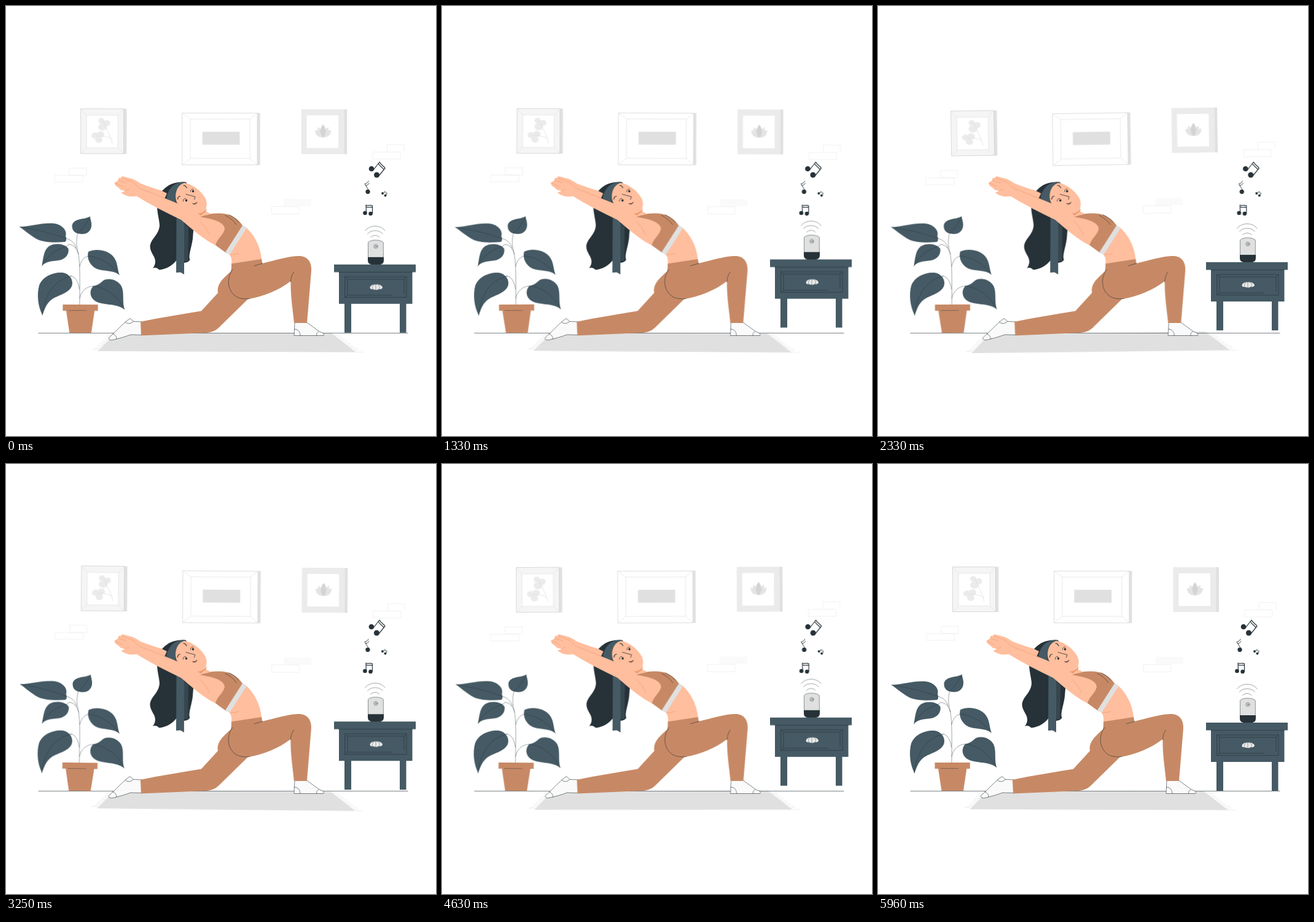
An HTML page that plays this animation: 700 px wide and 700 px high, repeating every 6000 ms.

```html
<!DOCTYPE html>
<html lang="en">
<head>
<meta charset="utf-8">
<title>Yoga at home</title>
<style>
  html, body { margin: 0; width: 100%; height: 100%; overflow: hidden; background: #fff; }
  svg { display: block; width: 100vw; height: 100vh; }

  #wall, #plant { animation: sway 3s linear -35ms infinite; }
  #wall { transform-origin: 363px 367px; }
  #plant { transform-origin: 108px 437px; animation-duration: 1.5s; }
  #table { animation: float 3s linear -35ms infinite; }
  .shake { animation: shake 6s linear -35ms infinite; }

  @keyframes sway {
    0%, 100% { transform: rotate(0deg); }
    25% { transform: rotate(1deg); }
    75% { transform: rotate(-1deg); }
  }
  @keyframes float {
    0%, 100% { transform: translateY(0); }
    50% { transform: translateY(-9.33px); }
  }
  @keyframes shake {
    0%, 100% { transform: translateX(0); }
    10%, 90% { transform: translateX(-.93px); }
    20%, 80% { transform: translateX(1.87px); }
    30%, 50%, 70% { transform: translateX(-3.73px); }
    40%, 60% { transform: translateX(3.73px); }
  }

  .dark { fill: #263238; }
  .slate { fill: #455a64; }
  .tan { fill: #c78965; }
  .skin { fill: #ffbe9d; }
  .grey { fill: #e0e0e0; }
  .white { fill: #fff; }
  .line { fill: none; stroke: #263238; stroke-width: .6; stroke-linecap: round; stroke-linejoin: round; }
  .thin { stroke-width: .45; }
  .blush { fill: none; stroke: #eb996e; stroke-width: .6; stroke-linecap: round; }
  .pale { fill: none; stroke: #e0e0e0; stroke-width: .7; }
  .sock { fill: #fafafa; stroke: #263238; stroke-width: .6; stroke-linejoin: round; }
</style>
</head>
<body>
<svg viewBox="0 0 700 700">
  <g id="wall">
    <!-- bricks -->
    <g class="pale" style="stroke:#ebebeb">
      <path d="M79 276H125V287H79ZM103 276V264H131V276Z"/>
      <path d="M597 237.5H642V249H597ZM620.500 237V225.500H648V236.500"/>
      <path d="M477 326.500V338.500H432.500V326.500Z"/>
    </g>
    <path fill="#fafafa" d="M452 314H497V326H452Z"/>

    <!-- left picture -->
    <path class="grey" d="M191 167.500H196.300V241H191Z"/>
    <path fill="#f5f5f5" stroke="#c4c4c4" stroke-width=".6" d="M121.500 167.500H191.500V240.500H121.500Z"/>
    <path class="white" d="M131 178H182V231H131Z"/>
    <path class="pale" d="M121.500 167.500L131 178H182L191.500 167.500M121.500 240.500L131 231H182L191.500 240.500M131 178V231M182 178V231"/>
    <g fill="#ebebeb">
      <ellipse cx="155" cy="187" rx="5" ry="4.500"/>
      <ellipse cx="164" cy="191" rx="5.500" ry="5"/>
      <ellipse cx="157" cy="197" rx="7" ry="6"/>
      <ellipse cx="145" cy="211" rx="6" ry="5"/>
      <ellipse cx="154" cy="209" rx="6" ry="5"/>
      <ellipse cx="151" cy="218" rx="6" ry="5"/>
    </g>
    <path class="pale" style="stroke:#dadada" d="M158 187C163 200 170 210 173 224M147 212C156 212 166 212 172 217"/>

    <!-- middle picture -->
    <path class="grey" d="M409 174H413.500V259H409Z"/>
    <path class="white" stroke="#d9d9d9" stroke-width=".9" d="M286.700 174.300H409V258.700H286.700Z"/>
    <path class="pale" d="M300 184H397V248H300ZM286.700 174.300L300 184M409 174.300L397 184M286.700 258.700L300 248M409 258.700L397 248"/>
    <path class="grey" d="M319.500 204.700H380.300V225.700H319.500Z"/>

    <!-- right picture -->
    <path class="grey" d="M550 168H555V241H550Z"/>
    <path fill="#ebebeb" d="M480.500 168H550.500V241H480.500Z"/>
    <path class="white" d="M489.500 178H541V231H489.500Z"/>
    <g fill="#e4e4e4">
      <path d="M503 202C511 201 516 207 516 214C508 214 503 210 503 202ZM529 202C521 201 516 207 516 214C524 214 529 210 529 202Z"/>
      <path d="M507 197C514 200 517 207 516 214C509 211 507 205 507 197ZM525 197C518 200 515 207 516 214C523 211 525 205 525 197Z"/>
    </g>
    <path fill="#d4d4d4" d="M516 192.500C522 200 522 208 516 214C510 208 510 200 516 192.500Z"/>

    <!-- mat -->
    <path class="grey" d="M178.500 532.500H530L570 563.500L149.500 562Z"/>
    <path class="pale" style="stroke-width:.6" d="M176 535L164 538M172 539L160 542M168 543L156 546M164 547L152 550M160 551L148 554M156 555L144 558M152 559L140 559.500
      M533 535L546 538M538 539L551 542M543 543L556 546M548 547L561 550M553 551L566 554M558 555L574 558M564 560L574 560.500M569 563.300H582"/>
  </g>

  <path class="line" d="M53 532.500H654"/>

  <g id="plant">
    <path class="line thin" d="M120 486C120 450 121 425 118 405C115 392 113 385 117 368M97 378C105 380 112 385 114 394M101 388C110 388 115 394 118 404
      M134 407C126 409 122 415 120 424M104 439C113 440 118 449 119.500 461M142 456C132 456 122 464 120 476"/>
    <g class="slate">
      <path d="M22 359.500C40 359 60 352 78 354C92 356 100 366 97 375C99 379 98 383 96 384C80 385.500 62 385 51 380C40 374 32 367 22 359.500Z"/>
      <path d="M136.500 342.500C128 348 110 345 107.500 357C107 365 112 370 118 370.500C128 373 138 369 139 358C139.500 351 137 347 136.500 342.500Z"/>
      <path d="M58.500 423C61 407 62 397 70 391C80 385 96 387 101.500 395C103 404 97 411 89 413.500C78 416 67 414 58.500 423Z"/>
      <path d="M184.500 437.500C181 427 182 416 174 407C165 397 146 394 134 400C131 410 136 422 147 427.500C158 432.500 173 429 184.500 437.500Z"/>
      <path d="M59.500 503.500C52 489 50 470 54 455C59 441 76 433 92 434C104 436 110 446 107.500 455C104 466 89 470 79 475C68 480 63 492 59.500 503.500Z"/>
      <path d="M193 494C189 481 193 466 188 456C182 446 170 442.500 161 445.500C155 448 153 454 142 456C135.500 463 136 474 145 480C157 488 179 483 193 494Z"/>
    </g>
    <path class="line thin" d="M22 360C45 363 72 369 97 378M136.500 343C131 355 124 363 117 370M58.500 423C66 406 83 396 101 390M184.500 437.500C172 420 153 409 134 407M59 503.500C62 473 78 445 106 440M193 494C182 472 163 458 142 456"/>
    <path class="tan" d="M92.500 486H149.700V496H144.300L139 532H103.500L98 496H92.500Z"/>
    <path class="line thin" d="M102 495.700H131"/>
  </g>

  <g id="table">
    <g class="slate">
      <path d="M551 484H562V532H551ZM641 484H651.500V532H641Z"/>
      <path d="M542 430H661.500V485H542Z"/>
      <path d="M534 421H667V433.500H534Z"/>
    </g>
    <path class="line" d="M542 433.500H661.500M552 441H652V474.500H552ZM552 441L556 445H648L652 441M556 445V471L552 474.500M556 471H628M648 445V468"/>
    <path fill="#ebebeb" d="M592.500 459C592.500 455.500 596 453.500 602.500 453.500C609 453.500 613 455.500 613 459C611 462 607 461 606 461.500C603 463 600 462.500 599 461.500C596 461.500 593 461.500 592.500 459Z"/>
    <path class="line thin" d="M599 454.500C596 456 596 459 597 461.500M602 454V462.500M606 454.500C609 456 609 459 607 461.500"/>
    <path class="grey" stroke="#263238" stroke-width=".5" d="M589.500 410V385C593 380 610 380 614.300 385V410Z"/>
    <path class="dark" d="M589 409H615V414C615 419 612 421 608 421H596C592 421 589 419 589 414Z"/>
    <circle class="line thin" cx="602" cy="391.500" r="3.200"/>
    <circle class="line thin" cx="602" cy="391.500" r="1.300"/>
    <path class="line thin" d="M584.500 366C592 356 610 356 617 366M588.500 371C594 364 608 364 613 371M593.500 376.500C598 372.500 604 372.500 608 376.500"/>
  </g>

  <g class="shake">
    <!-- notes -->
    <g class="dark">
      <circle cx="595" cy="265" r="4.300"/><circle cx="603.500" cy="275" r="4.500"/>
      <circle cx="589" cy="302.300" r="3.600"/>
      <circle cx="613" cy="305" r="1.900"/><circle cx="617.500" cy="308.500" r="1.900"/>
      <circle cx="584.500" cy="337" r="3.300"/><circle cx="593.500" cy="338" r="3.200"/>
    </g>
    <g class="line" style="stroke-width:1.200">
      <path d="M598 267L608 254C610 259 615 260 617 264L606.500 277M606.500 257C608.500 261 613 262.500 615 266.500"/>
      <path d="M591 301L584 289.500C587 289 589.500 287.500 590 285M585.500 292.500C588 292 590 290.500 591 288.500" style="stroke-width:.9"/>
      <path d="M614 306L616.500 301.500L620.500 304.500L618.500 309M616 303L620 306" style="stroke-width:.6"/>
      <path d="M586.500 337L586 324C589 325.500 593 323.500 596.500 325L596.500 338M586.500 327C589 328.500 593 326.500 596.500 328"/>
    </g>

    <!-- hair -->
    <path class="dark" d="M293 287C268 284 250 299 246.500 318C244.500 332 249 344 250 356C250 372 236 378 234.500 391C234.500 402 243 407 243 416C243 421 241 424 239 427C245 424 248 429 250 429.500C262 428 272 422 279 412L288 418C294 418 298 416 299.500 413C296 405 304 390 304.500 372L307 345L320 325Z"/>
    <path fill="#37474f" d="M286 350L297 360L296.500 415L288 416Z"/>
    <path class="slate" d="M277.500 342L290 350V437L284 433.500L277 434Z"/>

    <!-- back arm -->
    <path class="skin" d="M203 282C218 289 240 297 252 300L262 305L258 314L218 302Z"/>
    <path class="slate" d="M293 286.800C277 284 263 296 261.500 314L277 324C274 310 279 294 293 286.800Z"/>

    <!-- torso -->
    <path class="skin" d="M389 359C403 371 414 389 416.500 414L367 421C368 413 367 408 362 402Z"/>
    <path class="blush" d="M365 405C370 405 374 404 379 403"/>
    <path class="tan" d="M314 343C333 336 356 336 366 341C375 345 383 353 386 359L359 402.500L340.500 389L326 362Z"/>
    <path class="grey" d="M385.500 356.500L391.500 362L364 405L357 401Z"/>
    <path class="line" d="M357 341C364 344 371 350 375 356M363 340C370 343 376 348 379 352"/>

    <!-- head -->
    <path class="skin" d="M278 320C273 306 279 290 291 288C304 290 319 302 325 314C328 322 327 329 323 333L334 338.500C330 340 320 341 312 345L300 342Z"/>
    <path fill="#eb996e" d="M312 337.500C318 338 323.500 335 326 329C327 333 325 336 321 337.500L317 341Z"/>
    <g class="dark">
      <ellipse cx="304.500" cy="301.500" rx="1.700" ry="2"/>
      <ellipse cx="293.500" cy="316.500" rx="1.700" ry="2"/>
    </g>
    <path class="line" d="M289 292C291.500 292 293 293.500 294 296M279.500 314.500C279.500 311.500 281 310 283.500 309.500" style="stroke-width:1.200"/>
    <path class="line" d="M300.500 302.500C300 299.500 302.500 297.500 305 298M288.500 318C288 315 290 313 292.500 313.500M293 306.500L308 310.500L306.500 315" style="stroke-width:.8"/>
    <path d="M303.500 321.500C306.500 322 309 321.500 311 319C310.500 322 307 324.500 303.500 321.500Z" fill="#a24e3f" stroke="#263238" stroke-width=".5"/>

    <!-- front arm and hands -->
    <path class="skin" d="M212 292C228 302 262 314 288 325C300 331 307 338 314 343C334 346 356 351 356 363C354 373 344 378 341 389.500C325 382 304 365 285 348C262 337 234 323 212 309Z"/>
    <path class="skin" d="M176.500 288L183 283.500L183 280L188 279.500L189 277L206 281.500C213 284 218 288 221 291.500L224 299L213 309.500C205 311.500 195 310 187.500 304L194 301L187 299.500L184 296.500L178 292Z"/>
    <path class="blush" d="M183 283.500L196 288M188 279.500L207 287C212 292 216 297 224 299.500C238 304 250 310 262 314.500M178 288L190 294M316 351C322 356 327 363 331 372M194 301L200 298"/>

    <!-- legs -->
    <path class="sock" d="M221 514L207.500 513.500L202 508.500C192 515 180 529 168 539.500C166 543 170 544.500 174 543.500C185 541 195 538 203 535L221 535.500Z"/>
    <path class="line" d="M194 514C197 518 203 518 207.500 513.500M174 534C178 535 180 538 180 542"/>
    <path class="sock" d="M470 515L469 536.500H517C519 533 515 531.500 511 530.500L489.500 515Z"/>
    <path class="line" d="M469.500 526C475 526 479 530 479 536.500M509 530C506 532 505 534 506 536.500"/>
    <path class="tan" d="M367 419.500L416 412L417.500 419C438 414 457 408 475 407C490 406 498 416 497 431L490 516H469C467 495 463 472 463.500 448C445 462 420 473 394 477L348 522C342 528 336 531.500 325 532L220 536.500L219 514C252 507 286 502 318 496.500L345 467C343 452 353 444 366 432C367 428 367 424 367 419.500Z"/>
    <path class="line" d="M369 429C360 440 359 460 372 471C379 477 388 477 397 476.500M404 423L417.500 419M463.500 449C464 441 466 436 469 433"/>
  </g>
</svg>
</body>
</html>
```
